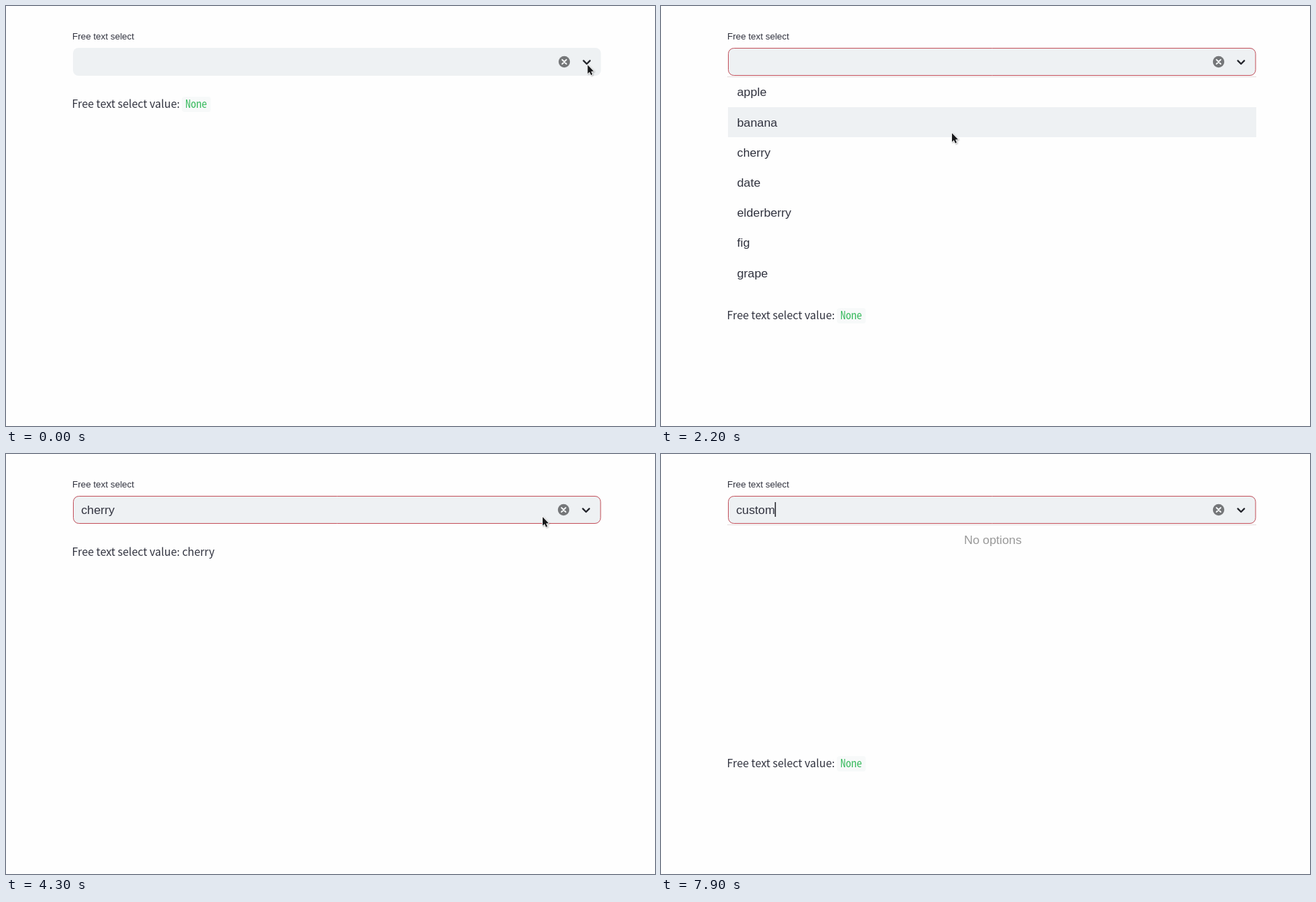
An HTML page with a canvas that plays this animation: 930x602 px, repeating every 8 s.

```html
<!DOCTYPE html>
<html lang="en">
<head>
<meta charset="utf-8">
<title>Free text select</title>
<style>
  html, body { margin: 0; width: 100%; height: 100%; overflow: hidden; background: #fefefe; }
  canvas { display: block; }
</style>
</head>
<body>
<canvas id="stage" width="930" height="602"></canvas>
<script>
const ctx = document.getElementById('stage').getContext('2d');
const LOOP = 8000;
const STEP = 100;
const FRUITS = ['apple', 'banana', 'cherry', 'date', 'elderberry', 'fig', 'grape'];
const ROW_TOP = 101.5;
const ROW_HEIGHT = 43.2;

const INK = '#31333f';
const FIELD = '#eef1f3';
const SANS = '"Liberation Sans", Arial, sans-serif';
const LIST_FONT = `17.28px ${SANS}`;
const LABEL_FONT = `12.96px ${SANS}`;
const BODY_FONT = '15.5px "Noto Sans CJK JP", "Noto Sans CJK SC", "Noto Sans", sans-serif';
const CODE_FONT = '15.5px "Noto Sans Mono CJK JP", "Noto Sans Mono CJK SC", monospace';

// Each move: start time, number of steps, destination
const START = { x: 833, y: 84 };
const MOVES = [
  [100, 1, 832, 84],
  [1200, 3, 586, 137],
  [1700, 1, 582, 145],
  [1900, 9, 185, 233],
  [2800, 3, 164, 198],
  [3600, 4, 716, 100],
  [4100, 5, 797, 84],
  [4700, 1, 799, 83],
  [5500, 2, 616, 79],
  [6000, 1, 616.5, 79]
];

// Time at which the typed text reaches each length
const TYPED = 'custom';
const KEY_TIMES = [7100, 7200, 7400, 7600, 7700, 7900];

const within = (t, from, to) => t >= from && t < to;

function pointerAt(t) {
  let { x, y } = START;
  for (const [start, steps, toX, toY] of MOVES) {
    if (t < start) break;
    const s = Math.min(1, ((t - start) / STEP + 1) / steps);
    const eased = s * s * (3 - 2 * s);
    x += (toX - x) * eased;
    y += (toY - y) * eased;
  }
  return { x, y };
}

function stateAt(t) {
  const typed = TYPED.slice(0, KEY_TIMES.filter(k => t >= k).length);
  const picked = within(t, 3300, 5000);
  const open = within(t, 500, 3300) || t >= 5700;
  return {
    focused: t >= 400,
    open,
    lowered: open || within(t, 3300, 3400),
    text: typed || (picked ? 'cherry' : ''),
    typing: typed !== '',
    options: FRUITS.filter(name => name.includes(typed)),
    caret: within(t, 400, 1600) || within(t, 2800, 3300) ||
           within(t, 5600, 6500) || typed !== '',
    value: within(t, 3400, 5300) ? 'cherry' : null,
    stale: within(t, 5100, 5300),
    pointer: pointerAt(t)
  };
}

function write(text, x, y, font, color = INK, align = 'left') {
  ctx.font = font;
  ctx.fillStyle = color;
  ctx.textAlign = align;
  ctx.fillText(text, x, y);
}

function roundBox(x, y, w, h, r) {
  ctx.beginPath();
  ctx.roundRect(x, y, w, h, r);
}

function strokeLines(color, width, ...lines) {
  ctx.strokeStyle = color;
  ctx.lineWidth = width;
  ctx.lineCap = ctx.lineJoin = 'round';
  ctx.beginPath();
  for (const line of lines) {
    line.forEach(([x, y], i) => i ? ctx.lineTo(x, y) : ctx.moveTo(x, y));
  }
  ctx.stroke();
}

function drawIcons(shift) {
  ctx.save();
  ctx.translate(shift, 0);
  ctx.fillStyle = '#757779';
  ctx.beginPath();
  ctx.arc(800, 80, 8.2, 0, Math.PI * 2);
  ctx.fill();
  strokeLines('#f6f8f9', 1.8, [[797, 77], [803, 83]], [[803, 77], [797, 83]]);
  strokeLines('#24262c', 2.3, [[827.6, 78.4], [832.2, 83], [836.8, 78.4]]);
  ctx.restore();
}

function drawField(state) {
  roundBox(96, 60, 756.5, 40, 8);
  ctx.fillStyle = FIELD;
  ctx.fill();
  if (state.focused) {
    roundBox(96.5, 60.5, 755.5, 39, 8);
    ctx.strokeStyle = '#c4505b';
    ctx.lineWidth = 1;
    ctx.stroke();
  }
  write(state.text, 107.7, 86, LIST_FONT);
  if (state.caret) {
    const end = 107.7 + ctx.measureText(state.text).width;
    ctx.fillStyle = '#24262c';
    ctx.fillRect(Math.round(end - 0.2), 69, 1.5, 21);
  }
  drawIcons(state.focused ? -1 : 0);
}

function drawMenu({ options, typing, pointer }) {
  ctx.fillStyle = '#e6dcdd';
  ctx.fillRect(95, 101, 758, 1);
  if (!options.length) {
    write('No options', 475.5, 129.3, LIST_FONT, '#999999', 'center');
    return;
  }
  const row = typing ? 0 : Math.max(0, Math.floor((pointer.y - ROW_TOP) / ROW_HEIGHT));
  const top = Math.round(ROW_TOP + row * ROW_HEIGHT);
  ctx.fillStyle = FIELD;
  ctx.fillRect(96, top, 757, row ? 43 : 42.5);
  options.forEach((name, i) => write(name, 109, Math.round(129.3 + i * ROW_HEIGHT), LIST_FONT));
}

function drawValue({ lowered, value }) {
  const y = lowered ? 303 : 0;
  write('Free text select value:', 94.6, 145.5 + y, BODY_FONT);
  if (value) {
    write(value, 252.4, 145.5 + y, BODY_FONT);
    return;
  }
  roundBox(252, 130 + y, 41.5, 22, 4);
  ctx.fillStyle = '#f7f9f9';
  ctx.fill();
  write('None', 257, 146 + y, CODE_FONT, '#3bbb60');
}

function drawPointer({ x, y }) {
  ctx.save();
  ctx.translate(x, y);
  ctx.beginPath();
  [[0.5, 0.5], [0.5, 13], [3.3, 10.5], [5.3, 15], [7.3, 14.1], [5.4, 9.8], [9.2, 9.5]]
    .forEach(([px, py]) => ctx.lineTo(px, py));
  ctx.closePath();
  ctx.shadowColor = 'rgba(0, 0, 0, 0.3)';
  ctx.shadowBlur = 2;
  ctx.shadowOffsetX = ctx.shadowOffsetY = 1;
  ctx.strokeStyle = '#fefefe';
  ctx.lineWidth = 1.6;
  ctx.lineJoin = 'round';
  ctx.stroke();
  ctx.shadowColor = 'transparent';
  ctx.fillStyle = '#17181a';
  ctx.fill();
  ctx.restore();
}

function draw(t) {
  const state = stateAt(t);
  ctx.fillStyle = '#fefefe';
  ctx.fillRect(0, 0, 930, 602);
  ctx.globalAlpha = state.stale ? 0.75 : 1;
  write('Free text select', 95, 48.3, LABEL_FONT);
  drawValue(state);
  ctx.globalAlpha = 1;
  drawField(state);
  if (state.open) drawMenu(state);
  if (!state.typing) drawPointer(state.pointer);
}

const began = performance.now();
function tick() {
  const t = (performance.now() - began) % LOOP;
  draw(Math.floor(t / STEP) * STEP);
  requestAnimationFrame(tick);
}
tick();
</script>
</body>
</html>
```
